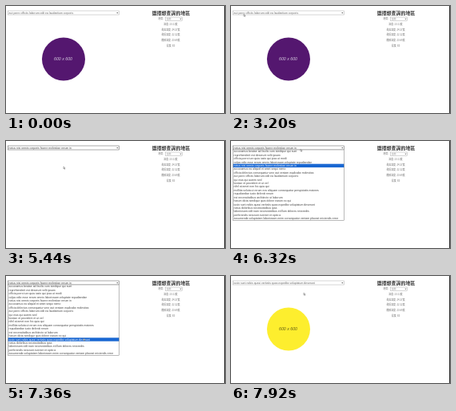
Animation, 274 px wide and 134 px high, one loop 8 s. Source, as an HTML page with a canvas:

```html
<!DOCTYPE html>
<html lang="zh-Hant">
<head>
<meta charset="utf-8">
<style>
html, body { margin: 0; width: 100%; height: 100%; overflow: hidden; background: #fff; }
canvas { display: block; width: 274px; height: 134px; }
</style>
</head>
<body>
<canvas id="stage"></canvas>
<script>
const W = 274, H = 134, LOOP = 8000, STEP = 80, SCALE = 4;
const canvas = document.getElementById('stage');
const ratio = window.devicePixelRatio || 1;
canvas.width = W * ratio;
canvas.height = H * ratio;
const ctx = canvas.getContext('2d');

const LATIN = '"Liberation Sans", Arial, sans-serif';
const CJK = '"Noto Sans CJK TC", "Noto Sans CJK", "Noto Sans CJK JP", sans-serif';
const ROW = 4.42, LIST_TOP = 11, TEXT = 3.47;

const options = [
  'accusamus beatae ad facilis cum similique qui sunt',
  'reprehenderit est deserunt velit ipsam',
  'officia porro iure quia iusto qui ipsa ut modi',
  'culpa odio esse rerum omnis laboriosam voluptate repudiandae',
  'natus nisi omnis corporis facere molestiae rerum in',
  'accusamus ea aliquid et amet sequi nemo',
  'officia delectus consequatur vero aut veniam explicabo molestias',
  'aut porro officiis laborum odit ea laudantium corporis',
  'qui eius qui autem sed',
  'beatae et provident et ut vel',
  'nihil at amet non hic quia qui',
  'mollitia soluta ut rerum eos aliquam consequatur perspiciatis maiores',
  'repudiandae iusto deleniti rerum',
  'est necessitatibus architecto ut laborum',
  'harum dicta similique quis dolore earum ex qui',
  'iusto sunt nobis quasi veritatis quas expedita voluptatum deserunt',
  'natus doloribus necessitatibus ipsa',
  'laboriosam odit nam necessitatibus et illum dolores reiciendis',
  'perferendis nesciunt eveniet et optio a',
  'assumenda voluptatem laboriosam enim consequatur veniam placeat reiciendis error'
];

// Each state holds from its time until the next one.
const states = [
  { at: 0, selected: 7, fill: '#54176f', ink: '#d8cfe0' },
  { at: 3680, selected: 7, open: true, focus: true },
  { at: 5360, selected: 4, fill: '#54176f', ink: '#d8cfe0', focus: true },
  { at: 5440, selected: 4, focus: true },
  { at: 5600, selected: 4, fill: '#f66b97', ink: '#5c2838', focus: true },
  { at: 6320, selected: 4, open: true, focus: true },
  { at: 7520, selected: 15, fill: '#f66b97', ink: '#5c2838' },
  { at: 7600, selected: 15 },
  { at: 7760, selected: 15, fill: '#fdee2e', ink: '#5e5c17' }
];

// Pointer path: time, x, y
const path = [
  [1200, 206, -1], [2000, 206, -1], [2800, 152, 12], [2880, 146, 12],
  [3200, 16, 10], [3680, 16, 10], [4480, 70, 13], [4640, 71, 14],
  [5280, 72, 32], [5600, 72, 32], [5920, 87, 10], [6320, 87, 10],
  [6560, 82, 40.5], [7120, 95, 78.5], [7360, 97, 78], [7520, 97, 78],
  [7920, 91, 21]
];

function pointerAt(t) {
  if (t < path[0][0]) return null;
  const next = path.findIndex(p => p[0] > t);
  if (next < 0) return path[path.length - 1].slice(1);
  const [t0, x0, y0] = path[next - 1], [t1, x1, y1] = path[next];
  const u = (t - t0) / (t1 - t0), ease = u * u * (3 - 2 * u);
  return [x0 + (x1 - x0) * ease, y0 + (y1 - y0) * ease];
}

function rect(x, y, w, h, color) {
  ctx.fillStyle = color;
  ctx.fillRect(x, y, w, h);
}

function frame(x, y, w, h, color, line = 0.5) {
  ctx.strokeStyle = color;
  ctx.lineWidth = line;
  ctx.strokeRect(x, y, w, h);
}

// Glyphs are set at a larger size and scaled down for accurate spacing.
function label(text, x, y, size, color, { family = LATIN, style = '', align = 'left' } = {}) {
  ctx.save();
  ctx.translate(x, y);
  ctx.scale(1 / SCALE, 1 / SCALE);
  ctx.font = `${style} ${size * SCALE}px ${family}`;
  ctx.textAlign = align;
  ctx.textBaseline = 'middle';
  ctx.fillStyle = color;
  ctx.fillText(text, 0, 0);
  ctx.restore();
}

function polygon(points, fill, stroke) {
  ctx.beginPath();
  points.forEach(([x, y]) => ctx.lineTo(x, y));
  ctx.closePath();
  ctx.fillStyle = fill;
  ctx.fill();
  if (stroke) {
    ctx.strokeStyle = stroke;
    ctx.lineWidth = 0.4;
    ctx.stroke();
  }
}

function arrow(x, y) {
  polygon([[x - 1, y - 0.5], [x + 1, y - 0.5], [x, y + 0.8]], '#555');
}

function drawWeather() {
  const centered = { family: CJK, align: 'center' };
  label('選擇想查詢的地區', 206.5, 8.6, 5.95, '#333', { ...centered, style: 'bold' });
  label('地區:', 190.5, 16.3, 3, '#666', { family: CJK });
  frame(199.5, 14, 21, 4.6, '#aaa');
  label('台北', 201, 16.3, 2.8, '#666', { family: CJK });
  arrow(218.5, 16.3);
  ['溫度: 23.11度', '最高溫度: 24.27度', '最低溫度: 22.22度', '體感溫度: 23.69度', '濕度: 83']
    .forEach((line, i) => label(line, 206, 23.2 + i * 6.55, 2.9, '#666', centered));
}

function drawCircle({ fill, ink }) {
  ctx.beginPath();
  ctx.arc(72, 66.5, 27, 0, Math.PI * 2);
  ctx.fillStyle = fill;
  ctx.fill();
  label('600 x 600', 71.5, 67, 5.2, ink, { style: 'italic', align: 'center' });
}

function drawSelect({ selected, focus }) {
  frame(2.5, 6, 139, 5, focus ? '#555' : '#aaa');
  label(options[selected], 3.6, 8.7, TEXT, focus ? '#444' : '#666');
  arrow(139.3, 8.6);
}

function drawList(selected, pointer) {
  const hovered = Math.floor((pointer[1] - LIST_TOP) / ROW);
  const active = hovered >= 0 ? hovered : selected;
  const height = ROW * options.length;
  rect(2.5, LIST_TOP, 139, height, '#fff');
  rect(2.5, LIST_TOP + active * ROW, 139, ROW, '#1967d2');
  options.forEach((text, i) =>
    label(text, 3.6, LIST_TOP + (i + 0.53) * ROW, TEXT, i === active ? '#fff' : '#444'));
  frame(2.5, LIST_TOP, 139, height, '#777');
}

function drawPointer([x, y]) {
  const shape = [[0, 0], [0, 3], [0.7, 2.4], [1.2, 3.4], [1.6, 3.2], [1.2, 2.2], [2.1, 2.1]];
  polygon(shape.map(([dx, dy]) => [x + dx, y + dy]), '#fff', '#444');
}

function draw(now) {
  const t = Math.floor((now % LOOP) / STEP) * STEP;
  const state = states.filter(s => s.at <= t).pop();
  const pointer = pointerAt(t);
  ctx.setTransform(ratio, 0, 0, ratio, 0, 0);
  rect(0, 0, W, H, '#fff');
  rect(W - 1, 0, 1, H, '#333');
  drawWeather();
  if (state.fill) drawCircle(state);
  drawSelect(state);
  if (state.open) drawList(state.selected, pointer);
  if (pointer) drawPointer(pointer);
}

const start = performance.now();
function tick() {
  draw(performance.now() - start);
  requestAnimationFrame(tick);
}
tick();
</script>
</body>
</html>
```
